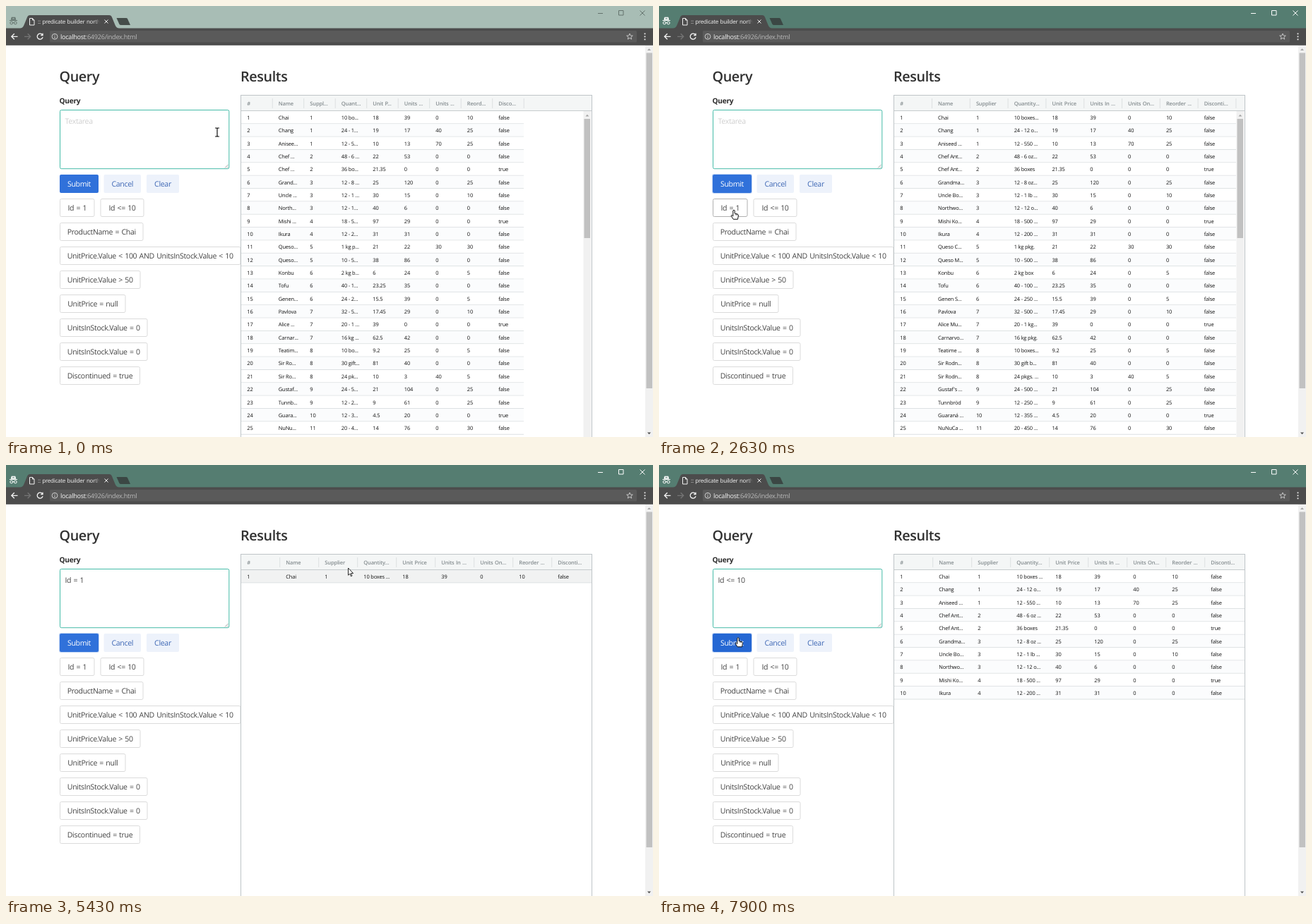
Animation, 916 px wide and 611 px high, one loop 8000 ms. Source, as an HTML page:

```html
<!DOCTYPE html>
<html lang="en">
<head>
<meta charset="utf-8">
<title>Predicate builder</title>
<style>
html, body { margin: 0; width: 100%; height: 100%; overflow: hidden; background: #fff; }
svg { display: block; width: 916px; height: 611px; }
text { font: 10.55px "Open Sans", "Noto Sans", sans-serif; letter-spacing: -.03em; word-spacing: .08em; fill: #444; text-rendering: geometricPrecision; white-space: pre; }
.title { font-size: 19.8px; font-weight: 600; letter-spacing: -.02em; fill: #303030; }
.label { font-size: 10.2px; font-weight: 700; fill: #2b2b2b; }
.tab { font-size: 8px; fill: #f4f4f4; }
.url { font-size: 9.15px; fill: #b9b9b9; }
.head { font-size: 7.5px; font-weight: 600; letter-spacing: -.02em; fill: #858d90; }
.cell { font-size: 7.45px; letter-spacing: -.022em; word-spacing: 0; fill: #101010; }
.mid { text-anchor: middle; }
.box { fill: #fff; stroke: #dbdbdb; }
.ring { fill: none; stroke: #3273dc; stroke-opacity: .28; stroke-width: 1.5; visibility: hidden; }
.hover .box { stroke: #b0b0b0; }
.focus .box { stroke: #3273dc; }
.focus .ring { visibility: visible; }
.primary .box { fill: #3071da; stroke: none; }
.primary.hover .box { fill: #2567d3; }
.primary text { fill: #fff; }
.light .box { fill: #edf2fb; stroke: none; }
.light.hover .box { fill: #e1eaf7; }
.light text { fill: #3f68b5; }
.icon { fill: none; stroke: #f2f2f2; }
</style>
</head>
<body>
<svg viewBox="0 0 916 611">
  <rect id="bar" width="916" height="32"/>
  <g id="frameIcons" fill="none">
    <path d="M838 10.5h7M867.5 6.5h6.500v6.500h-6.500zM897.500 6.500l7 7m0-7l-7 7"/>
    <path d="M5 20.500h11M9.500 24q1-.8 2 0"/>
    <path d="M7.800 19l.6-2.500h4.200l.6 2.500z" stroke-width="1.600"/>
    <circle cx="7.700" cy="24" r="1.900"/><circle cx="13.300" cy="24" r="1.900"/>
  </g>
  <path d="M20 32Q24 31 25.500 27L30 16Q31 13 34 13H146Q149 13 150 16L154.500 27Q156 31 160 32Z" fill="#4c4c4c"/>
  <path id="newTab" d="M156.500 17H170Q171.500 17 172 18L176 27H163Q161 27 160.300 25.500Z"/>
  <path class="icon" d="M33.500 17.500h4l2.500 2.500v7h-6.500zM37.500 17.500v2.500h2.500M139.500 19.500l5 5m0-5l-5 5"/>
  <text class="tab" x="45" y="25">:: predicate builder north</text>
  <rect x="125" y="14" width="8" height="16" fill="url(#fade)"/>
  <linearGradient id="fade"><stop stop-color="#4c4c4c" stop-opacity="0"/><stop offset="1" stop-color="#4c4c4c"/></linearGradient>
  <rect y="31.500" width="916" height="24.300" fill="#4c4c4c"/>
  <rect x="62" y="35" width="831" height="16.500" rx="1.500" fill="#5a5a5a"/>
  <path class="icon" stroke-width="1.300" d="M16.500 43.300H8M11.800 39.300l-4 4 4 4M51.600 41a4 4 0 1 0 .5 3.300M52 38.800v2.800h-2.800"/>
  <path class="icon" stroke-width="1.300" style="stroke:#757575" d="M26 43.300h8.500M30.700 39.300l4 4-4 4"/>
  <g class="icon" style="stroke:#cfcfcf"><circle cx="69" cy="43.300" r="3.900"/><path d="M69 41v1m0 1v2.600"/>
    <path d="M883 39l1.200 2.900 3.100.2-2.400 2 .8 3-2.700-1.700-2.700 1.700.8-3-2.400-2 3.100-.2z" stroke-width=".9"/></g>
  <path d="M904.500 38.500v1.800m0 2.200v1.800m0 2.200v1.800" stroke="#eee" stroke-width="1.800"/>
  <text class="url" x="77" y="46.500"><tspan fill="#f4f4f4">localhost</tspan>:64926/index.html</text>

  <rect x="905" y="56" width="11" height="555" fill="#f1f1f1"/>
  <rect x="906.500" y="66.500" width="8.500" height="475.500" fill="#c1c1c1"/>
  <path d="M908 63l2.500-2.800L913 63z" fill="#a3a3a3"/>
  <path d="M908 604.500l2.500 2.800 2.500-2.800z" fill="#505050"/>

  <text class="title" x="75.500" y="107">Query</text>
  <text class="title" x="332" y="107">Results</text>
  <text class="label" x="75.500" y="138">Query</text>
  <rect x="76.500" y="147.500" width="239.300" height="83.200" rx="2" fill="#fff" stroke="#45bba8"/>
  <path d="M310 229.500l4.500-4.500M313 229.500l1.500-1.500" stroke="#888" stroke-width=".8"/>
  <text id="query" x="83.500" y="167"></text>
  <g id="buttons"></g>
  <g id="table"></g>
  <g id="cursor" stroke-linejoin="round"></g>
</svg>
<script>
const $ = id => document.getElementById(id);
const LOOP = 8000;

// label, left, right, top, style
const buttons = [
  ['Submit', 76, 131, 239, 'primary'], ['Cancel', 138.5, 191, 239, 'light'], ['Clear', 199, 245, 239, 'light'],
  ['Id = 1', 76, 125.5, 273], ['Id <= 10', 133.5, 195.5, 273],
  ['ProductName = Chai', 76, 194.5, 307],
  ['UnitPrice.Value < 100 AND UnitsInStock.Value < 10', 76, 332.5, 341],
  ['UnitPrice.Value > 50', 76, 190.5, 375], ['UnitPrice = null', 76, 169.5, 409],
  ['UnitsInStock.Value = 0', 76, 200.5, 443], ['UnitsInStock.Value = 0', 76, 200.5, 477],
  ['Discontinued = true', 76, 190, 511],
].map(([label, left, right, top, style = '']) => ({ label, left, right, top, style }));
const BUTTON_H = 26;

// "|" marks the cut in narrow columns, "~" an ellipsis in wider ones
const headers = ['#', 'Name', 'Suppl|ier', 'Quant|ity~', 'Unit P|rice', 'Units |In ~', 'Units |On~', 'Reord|er ~', 'Disco|nti~'];
// name, supplier, quantity, price, stock, reorder level
const products = `Chai;1;10 bo|xes~;18;39;10
Chang;1;24 - 1|2 o~;19;17;25
Anisee|d ~;1;12 - 5|50 ~;10;13;25
Chef |Ant~;2;48 - 6 |oz~;22;53;0
Chef |Ant~;2;36 bo|xes;21.35;0;0
Grand|ma~;3;12 - 8 |oz~;25;120;25
Uncle |Bo~;3;12 - 1 |lb ~;30;15;10
North|wo~;3;12 - 1|2 o~;40;6;0
Mishi |Ko~;4;18 - 5|00 ~;97;29;0
Ikura;4;12 - 2|00 ~;31;31;0
Queso| C~;5;1 kg p|kg.;21;22;30
Queso| M~;5;10 - 5|00 ~;38;86;0
Konbu;6;2 kg b|ox;6;24;5
Tofu;6;40 - 1|00 ~;23.25;35;0
Genen| S~;6;24 - 2|50 ~;15.5;39;5
Pavlova;7;32 - 5|00 ~;17.45;29;10
Alice |Mu~;7;20 - 1 |kg~;39;0;0
Carnar|vo~;7;16 kg |pkg.;62.5;42;0
Teatim|e ~;8;10 bo|xes~;9.2;25;5
Sir Ro|dn~;8;30 gift| b~;81;40;0
Sir Ro|dn~;8;24 pk|gs. ~;10;3;5
Gustaf|'s ~;9;24 - 5|00 ~;21;104;25
Tunnb|röd;9;12 - 2|50 ~;9;61;25
Guara|ná ~;10;12 - 3|55 ~;4.5;20;0
NuNu|Ca ~;11;20 - 4|50 ~;14;76;30`.split('\n');
const onOrder = { 2: 40, 3: 70, 11: 30, 21: 40 };
const discontinued = [5, 9, 17, 24];
const rows = products.map((line, i) => {
  const [name, supplier, quantity, price, stock, reorder] = line.split(';'), id = i + 1;
  return [id, name, supplier, quantity, price, stock, onOrder[id] || 0, reorder, discontinued.includes(id)];
});

const layouts = {
  narrow: { pitch: 44.5, right: 733, count: 25 },
  medium: { pitch: 53.8, right: 817, count: 25 },
  one: { pitch: 55, right: 829, count: 1 },
  ten: { pitch: 55, right: 829, count: 10 },
};

// [start time, value]
const queries = [[0, ''], [3130, 'Id = 1'], [6700, 'Id <= 10']];
const focuses = [[0, ''], [870, 'Submit'], [3130, 'Id = 1'], [3930, 'Submit'], [6700, 'Id <= 10'], [7500, 'Submit']];
const tables = [[0, 'narrow'], [1130, 'medium'], [4060, 'one'], [7720, 'ten']];
const ACTIVATE = 870;

// time, x, y of the pointer
const path = [
  [30, 299, 179], [830, 87, 250], [1730, 87, 250], [1830, 94, 250], [1970, 94, 250],
  [2350, 105, 297], [2630, 106, 289], [3400, 106, 289], [3900, 115, 247], [4830, 115, 247],
  [5430, 484.5, 146], [5630, 781, 143], [5730, 781, 143], [6230, 120, 285], [6530, 164, 289],
  [6700, 164, 289], [7030, 146, 246], [7300, 112, 244.5],
];

const cursors = {
  text: '<path d="M-3-6h2.200l.8.7.8-.7H3M-3 6h2.200L0 5.300.8 6H3M0-5.300V5.300" fill="none" stroke="#111" stroke-width="1.200"/>',
  hand: '<path d="M-1.200 1Q0-.8 1.200 1V5L5.500 6.200Q6.600 6.600 6.400 8L5.500 13.300H-.8L-3.700 8.800Q-4 7.200-2.600 7.700L-1.200 9Z" fill="#fff" stroke="#111"/><path d="M2.800 5.600v2M4.500 6.100v1.700" stroke="#111" stroke-width=".7"/>',
  arrow: '<path d="M0 0V10.200L2.300 8.100 3.900 11.800 5.400 11.100 3.800 7.600H7.100Z" fill="#fff" stroke="#111" stroke-width=".9"/>',
};

const esc = s => String(s).replace(/&/g, '&amp;').replace(/</g, '&lt;');
const text = (cls, x, y, s) => `<text class="${cls}" x="${x}" y="${y}">${esc(s)}</text>`;
const rect = (x, y, w, h, attrs) => `<rect x="${x}" y="${y}" width="${w}" height="${h}" ${attrs}/>`;
const at = (steps, t) => steps.filter(s => s[0] <= t).pop()[1];

function fit(value, name) {
  const [kept, rest] = String(value).split('|');
  if (rest === undefined) return kept;
  if (name === 'narrow') return kept + '...';
  const full = kept + rest;
  return (layouts[name].right > 820 ? full.replace(/(boxes|oz)~/, '$1 ~') : full).replace('~', '...');
}

function tableMarkup(name, hovered) {
  const { pitch, right, count } = layouts[name], rowH = 18.35, top = 148.5;
  const line = (values, cls, y) => values.map((v, i) => text(cls, 341.3 + pitch * i, y, fit(v, name))).join('');
  let out = rect(332.5, 126.5, 497, 500, 'fill="#fff" stroke="#bfc5c8"') + rect(333, 127, 496, 21, 'fill="#f4f6f6"');
  out += '<path d="M333 148.500H829" stroke="#c6cbcd"/>' + line(headers, 'head', 140.7);
  for (let i = 1; i <= 9; i++) {
    const x = 332.7 + pitch * i;
    if (x < 826) out += `<path d="M${x} 131v14" stroke="#dde0e1"/>`;
  }
  rows.slice(0, count).forEach((row, i) => {
    const y = top + rowH * i;
    const fill = hovered && !i ? '#f1f2f2' : i % 2 ? '#fbfcfd' : '#fff';
    out += rect(333, y + .5, right - 333, rowH - .5, `fill="${fill}"`);
    out += `<path d="M333 ${y + rowH}H${right}" stroke="#dce0e2"/>` + line(row, 'cell', y + 12.3);
  });
  if (count === 25) {
    out += rect(817.5, 149, 11, 470, 'fill="#f1f1f1"') + rect(818.5, 160, 8.5, 169, 'fill="#c1c1c1"')
      + '<path d="M820.500 156.500l2.400-2.800 2.400 2.800z" fill="#a3a3a3"/>';
  }
  return out;
}

function pointer(t) {
  const next = path.findIndex(p => p[0] > t);
  if (next < 1) return (next ? path[path.length - 1] : path[0]).slice(1);
  const [t0, x0, y0] = path[next - 1], [t1, x1, y1] = path[next];
  const u = (t - t0) / (t1 - t0), e = u * u * (3 - 2 * u);
  return [x0 + (x1 - x0) * e, y0 + (y1 - y0) * e];
}

$('buttons').innerHTML = buttons.map(({ label, left, right, top, style }) => {
  const w = right - left, inset = style ? 0 : .5;
  return `<g class="${style}">` + rect(left - .3, top - .3, w + .6, BUTTON_H + .6, 'rx="2.500" class="ring"')
    + rect(left + inset, top + inset, w - 2 * inset, BUTTON_H - 2 * inset, 'rx="2" class="box"')
    + text('mid', (left + right) / 2, top + 17, label) + '</g>';
}).join('');
buttons.forEach((b, i) => b.node = $('buttons').children[i]);

let shownTable = '', shownCursor = '';

function draw(t) {
  const active = t >= ACTIVATE;
  $('bar').setAttribute('fill', active ? '#557d71' : '#a8bdb5');
  $('newTab').setAttribute('fill', active ? '#3b4744' : '#454d4a');
  $('frameIcons').setAttribute('stroke', active ? '#fff' : '#64736d');

  const [x, y] = pointer(t), focus = at(focuses, t), query = at(queries, t);
  let kind = x > 76 && x < 316 && y > 147 && y < 231 ? 'text' : 'arrow';
  for (const b of buttons) {
    const hover = x >= b.left && x <= b.right && x < 332 && y >= b.top && y <= b.top + BUTTON_H;
    if (hover) kind = 'hand';
    b.node.classList.toggle('hover', hover);
    b.node.classList.toggle('focus', b.label === focus);
  }

  $('query').textContent = query || 'Textarea';
  $('query').style.fill = query ? '#444' : '#cfcfcf';

  const name = at(tables, t), rowHover = x > 332 && x < 829 && y > 145 && y < 167;
  if (shownTable !== name + rowHover) {
    shownTable = name + rowHover;
    $('table').innerHTML = tableMarkup(name, rowHover);
  }
  if (shownCursor !== kind) $('cursor').innerHTML = cursors[shownCursor = kind];
  $('cursor').setAttribute('transform', `translate(${x.toFixed(2)} ${y.toFixed(2)})`);
}

function tick() {
  draw(performance.now() % LOOP);
  requestAnimationFrame(tick);
}
tick();
</script>
</body>
</html>
```
